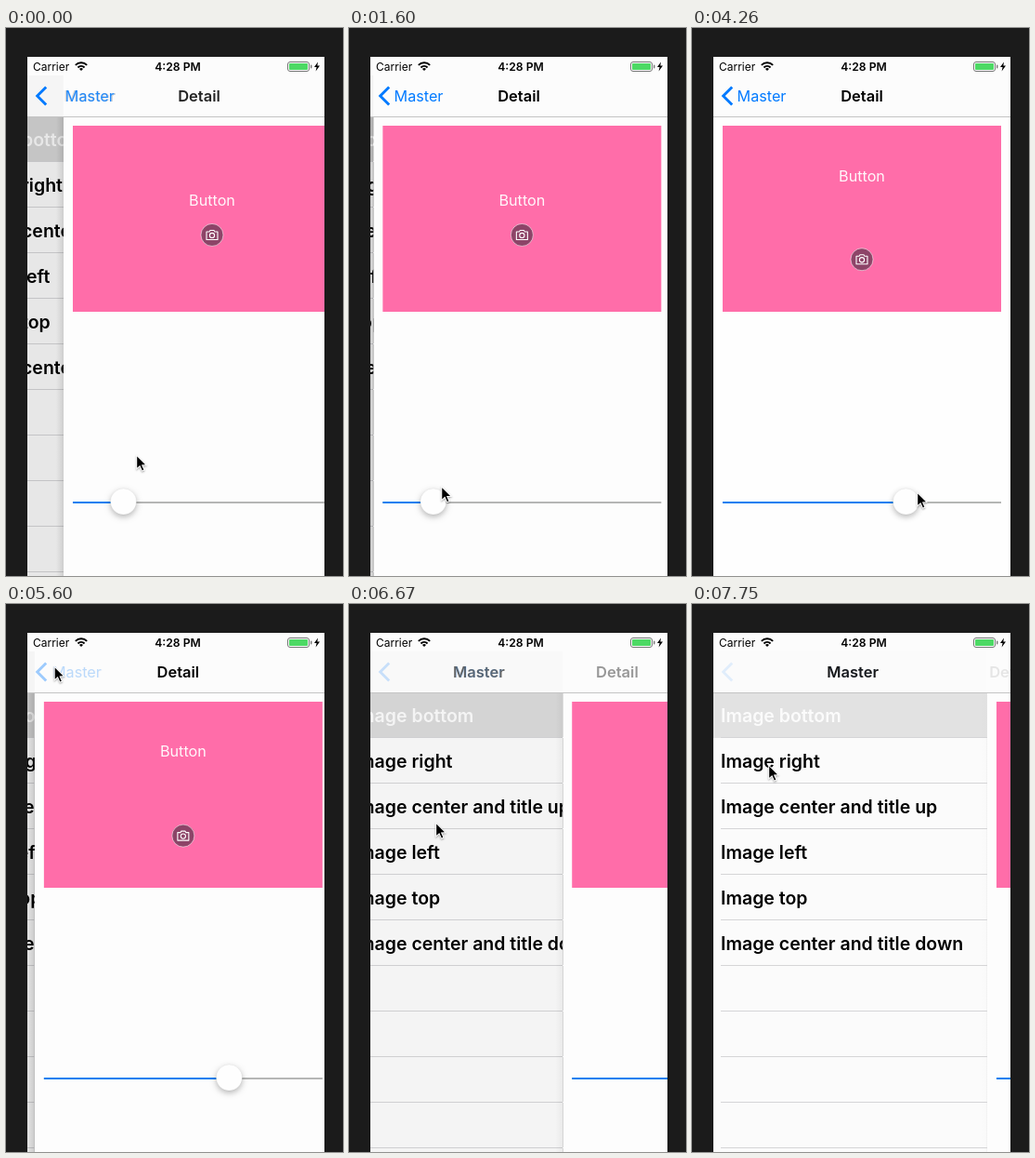
Recreate the animation shown at these times as an HTML page with a canvas. Size 363 px wide and 589 px high, loop 8 s.

```html
<!DOCTYPE html>
<html lang="en">
<head>
<meta charset="utf-8">
<title>Button layout demo</title>
<style>
html, body { margin: 0; width: 363px; height: 589px; overflow: hidden; background: #1b1b1b; }
canvas { display: block; }
</style>
</head>
<body>
<canvas id="stage" width="363" height="589"></canvas>
<script>
const ctx = document.getElementById('stage').getContext('2d');
const FONT = 'Inter, "Liberation Sans", sans-serif';
const BLUE = '#007aff', BAR = '#fcfcfc';
const LEFT = 23, TOP = 31, WIDTH = 320, BAR_END = 95, ROW = 49;
const LOOP = 8000;
const TICKS = [0, 270, 540, 800, 1070, 1340, 1600, 1870, 2130, 2400,
  2660, 2930, 3200, 3460, 3730, 3990, 4260, 4530, 4800, 5070,
  5330, 5600, 5870, 6140, 6410, 6670, 6940, 7210, 7480, 7750];
const ROWS = ['Image bottom', 'Image right', 'Image center and title up',
  'Image left', 'Image top', 'Image center and title down'];

// [time, x, y]
const POINTER = [[0, 141, 460], [800, 121, 469], [1870, 93, 502], [3200, 93, 502],
  [3460, 98, 502], [3730, 170, 501], [3990, 231, 500], [4260, 243, 500], [4530, 244, 500],
  [4800, 0, 0], [5070, 50, 64], [5330, 52.5, 68], [5600, 52.5, 68],
  [6670, 94, 236], [7750, 83, 174]];
const THUMB = [[3200, 87.5], [3460, 93], [3730, 160], [3990, 217], [4260, 230.5], [4530, 232.5]];

function along(keys, t) {
  if (t <= keys[0][0]) return keys[0].slice(1);
  for (let i = 1; i < keys.length; i++) {
    const a = keys[i - 1], b = keys[i];
    if (t <= b[0]) {
      const k = (t - a[0]) / (b[0] - a[0]);
      return a.slice(1).map((v, j) => v + (b[j + 1] - v) * k);
    }
  }
  return keys[keys.length - 1].slice(1);
}

// Remaining distance of a critically damped spring, 1 to 0
const spring = x => (1 + x) * Math.exp(-x);

function pose(t) {
  const pop = t >= 5600;
  let p = 0, q = 0;
  if (pop) {
    p = 1 - spring(0.24 + (t - 5600) * 0.00184);
    q = Math.pow(p, 1.17);
  } else if (t < 3460) {
    p = spring(3.64 + t * 0.00184);
    q = 0.142 * Math.pow(Math.max(0, 1 - t / 1400), 2);
  }
  return { pop, p, q, off: p * WIDTH, thumb: along(THUMB, t)[0], pointer: along(POINTER, t) };
}

function rect(x, y, w, h, color) {
  ctx.fillStyle = color;
  ctx.fillRect(x, y, w, h);
}

function poly(points, color) {
  ctx.beginPath();
  points.forEach(([x, y]) => ctx.lineTo(x, y));
  ctx.closePath();
  ctx.fillStyle = color;
  ctx.fill();
}

function disc(x, y, r, color) {
  ctx.beginPath();
  ctx.arc(x, y, r, 0, Math.PI * 2);
  ctx.fillStyle = color;
  ctx.fill();
}

function box(x, y, w, h, r) {
  ctx.beginPath();
  ctx.roundRect(x, y, w, h, r);
}

function text(str, x, y, size, weight, color, align = 'left', alpha = 1) {
  ctx.save();
  ctx.globalAlpha = alpha;
  ctx.font = `${weight} ${size}px ${FONT}`;
  ctx.textAlign = align;
  ctx.fillStyle = color;
  ctx.fillText(str, x, y);
  ctx.restore();
}

function drawMaster({ p, off }) {
  const x = LEFT - 0.3 * (WIDTH - off);
  rect(LEFT, BAR_END, off, 500, '#fff');
  const shade = 217 + 17 * p * p * p;
  rect(LEFT, BAR_END, off, ROW, `rgb(${shade},${shade},${shade})`);
  for (let i = 0; i < 10; i++) {
    rect(x + 15.5, BAR_END + ROW * (i + 1) - 1, WIDTH, 1, '#d8d8da');
  }
  ROWS.forEach((name, i) =>
    text(name, x + 15.5, 126.5 + ROW * i, 19.5, 600, i ? '#000' : '#fff'));
  const edge = LEFT + off;
  rect(LEFT, BAR_END, off, 500, `rgba(0,0,0,${0.1 * (1 - p) + 0.006})`);
  const fade = ctx.createLinearGradient(edge - 8, 0, edge, 0);
  fade.addColorStop(0, 'rgba(0,0,0,0)');
  fade.addColorStop(1, `rgba(0,0,0,${0.12 * (1 - p)})`);
  rect(edge - 8, BAR_END, 8, 500, fade);
}

function drawCamera(x, y) {
  disc(x, y, 12, '#8d4468');
  ctx.strokeStyle = 'rgba(255,255,255,.6)';
  ctx.lineWidth = 0.9;
  ctx.stroke();
  ctx.strokeStyle = '#fff';
  ctx.lineWidth = 1.1;
  ctx.lineJoin = 'round';
  ctx.beginPath();
  [[-6, -3.5], [-3, -3.5], [-2, -5], [2, -5], [3, -3.5], [6, -3.5], [6, 5], [-6, 5]]
    .forEach(([dx, dy]) => ctx.lineTo(x + dx, y + dy));
  ctx.closePath();
  ctx.stroke();
  ctx.beginPath();
  ctx.arc(x, y + 0.5, 2.6, 0, Math.PI * 2);
  ctx.stroke();
}

function drawDetail({ off, thumb }) {
  const gap = 50 * (thumb - 47) / 272;
  const mid = 183 + off;
  rect(LEFT + off, BAR_END, WIDTH, 500, off > 1 ? '#fdfdfd' : '#fefefe');
  rect(33 + off, 105, 300, 200, '#ff6da9');
  text('Button', mid, 198.5 - gap, 16.2, 400, '#fff', 'center', 0.95);
  drawCamera(mid, 215 + gap);
  const knob = thumb + off;
  rect(33 + off, 509, 300, 2, '#b5b6b5');
  rect(33 + off, 509, knob - 33 - off, 2, '#0a7ff0');
  ctx.save();
  ctx.shadowColor = 'rgba(0,0,0,.28)';
  ctx.shadowBlur = 6;
  ctx.shadowOffsetY = 2.5;
  disc(knob, 509, 14, '#fefefe');
  ctx.restore();
  ctx.strokeStyle = 'rgba(0,0,0,.08)';
  ctx.lineWidth = 0.6;
  ctx.stroke();
}

function drawBar({ pop, p, q, off }) {
  rect(LEFT, TOP, WIDTH, BAR_END - TOP, BAR);
  rect(LEFT, 51, off, BAR_END - 51, `rgba(0,0,0,${0.03 * (1 - p)})`);
  rect(LEFT, BAR_END, WIDTH, 1, '#c4c4c4');

  ctx.save();
  ctx.globalAlpha = pop ? 0.38 - 0.3 * q : 1;
  ctx.strokeStyle = BLUE;
  ctx.lineWidth = 2.9;
  ctx.lineJoin = 'miter';
  ctx.beginPath();
  ctx.moveTo(43.2, 63.5);
  ctx.lineTo(33.7, 73);
  ctx.lineTo(43.2, 82.5);
  ctx.stroke();
  ctx.restore();

  const back = 75 + 108 * q;
  text('Master', back, 79, 16.5, 600, '#000', 'center', q);
  text('Master', back, 79, 16.2, 400, BLUE, 'center', pop ? 0.25 * (1 - q * q) : 1 - q);
  text('Detail', 183 + 176 * q, 79, 16.5, 600, '#000', 'center', 1 - q);
}

function drawStatus() {
  text('Carrier', 29, 45.5, 12, 400, '#000');
  text('4:28 PM', 185, 45.5, 12.2, 600, '#000', 'center');

  ctx.strokeStyle = '#000';
  ctx.lineWidth = 2;
  [5, 8.7].forEach(r => {
    ctx.beginPath();
    ctx.arc(81, 46, r, -Math.PI * 0.75, -Math.PI * 0.25);
    ctx.stroke();
  });
  ctx.beginPath();
  ctx.moveTo(81, 46);
  ctx.arc(81, 46, 2.8, -Math.PI * 0.75, -Math.PI * 0.25);
  ctx.fillStyle = '#000';
  ctx.fill();

  box(303.5, 36.5, 23, 10, 2.5);
  ctx.strokeStyle = '#777';
  ctx.lineWidth = 1;
  ctx.stroke();
  box(305, 38, 20, 7, 1);
  ctx.fillStyle = '#4cd964';
  ctx.fill();
  box(328, 39.5, 1.4, 4, 0.7);
  ctx.fillStyle = '#777';
  ctx.fill();
  poly([[336, 36.5], [332, 42], [334.6, 42], [333.6, 46.5], [338, 40.6], [335.3, 40.6]], '#000');
}

function drawPointer([x, y]) {
  ctx.save();
  ctx.translate(x, y);
  ctx.shadowColor = 'rgba(0,0,0,.35)';
  ctx.shadowBlur = 2;
  ctx.shadowOffsetY = 1;
  poly([[-0.8, -1.8], [-0.8, 15], [3, 11.6], [5.3, 16.8], [8.6, 15.4], [6.4, 10.4], [11.2, 10.2]], '#fff');
  ctx.shadowColor = 'transparent';
  poly([[0.2, 0.6], [0.2, 12.8], [3.3, 9.9], [5.8, 15.5], [7.3, 14.8], [4.9, 9.4], [9, 9.3]], '#000');
  ctx.restore();
}

function draw(t) {
  const s = pose(t);
  rect(0, 0, 363, 589, '#1b1b1b');
  ctx.save();
  ctx.beginPath();
  ctx.rect(LEFT, TOP, WIDTH, 589 - TOP);
  ctx.clip();
  if (s.off > 0) drawMaster(s);
  drawDetail(s);
  drawBar(s);
  drawStatus();
  ctx.restore();
  drawPointer(s.pointer);
}

const start = performance.now();
function frame() {
  const t = (performance.now() - start) % LOOP;
  draw(TICKS.filter(v => v <= t).pop());
  requestAnimationFrame(frame);
}
frame();
</script>
</body>
</html>
```
